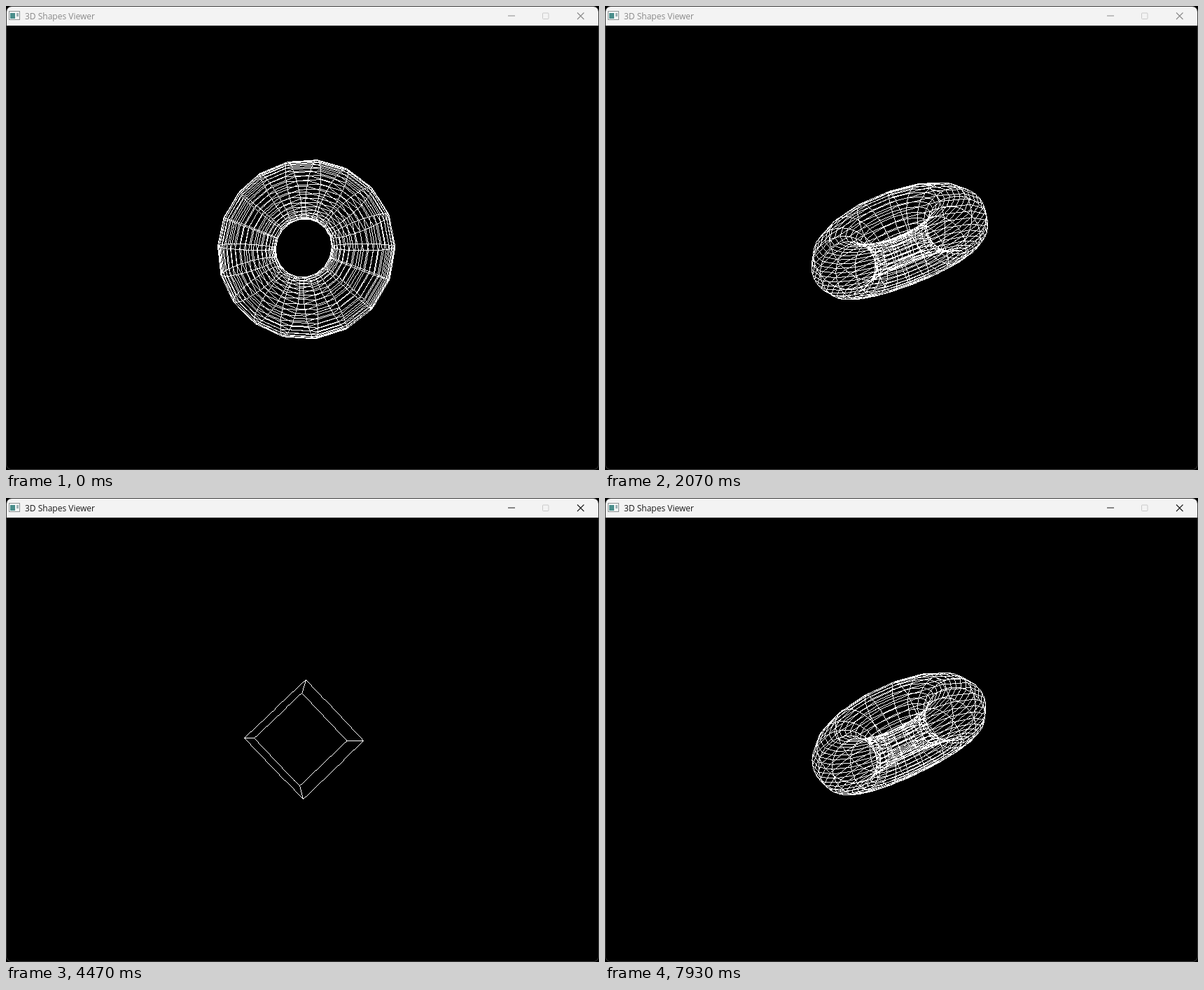
An HTML page with a canvas for the animation above (8 s loop, 847 px wide and 662 px high).

```html
<!DOCTYPE html>
<html lang="en">
<head>
<meta charset="utf-8">
<title>3D Shapes Viewer</title>
<style>
  html, body { margin: 0; width: 100%; height: 100%; overflow: hidden; background: #000; }
  canvas, svg { position: absolute; left: 0; top: 0; display: block; }
  text { font: 12px "Open Sans", "Noto Sans", sans-serif; }
</style>
</head>
<body>
<canvas id="view" width="847" height="662"></canvas>
<svg width="847" height="662" viewBox="0 0 847 662">
  <rect x="0.5" y="0.5" width="846" height="661" rx="7.5" fill="none" stroke="#3c3c3c"/>
  <path d="M1 28V8a7 7 0 0 1 7-7H839a7 7 0 0 1 7 7V28Z" fill="#f3f3f3"/>
  <g id="icon">
    <rect x="4.5" y="7.5" width="15" height="12" fill="#f4f6f6" stroke="#8d9494"/>
    <rect x="6" y="10" width="7" height="8" fill="#4b8f8c"/>
    <rect x="15" y="10" width="3" height="5" fill="#9fb3b5"/>
  </g>
  <text id="title" x="27" y="18.5">3D Shapes Viewer</text>
  <g fill="none">
    <path id="min" d="M717 14H727"/>
    <rect x="766.5" y="10" width="8.5" height="8.5" rx="1" stroke="#cacaca"/>
    <path id="close" d="M816 9.5L825.5 19M825.5 9.5L816 19" stroke-width="1.1"/>
  </g>
</svg>
<script>
const LOOP = 8000, STEP = 1000 / 15, FOCUS = 2200;
const W = 847, H = 662, CX = 423.5, CY = 344.5, FOCAL = 422.5, TOP = 28;

// time in ms, rotation in degrees
const SPIN = [[0, 12.6], [1200, 81.5], [2933, 173], [3300, 193], [4467, 267.2],
              [6000, 366.2], [7200, 442], [7460, 458.6], [8000, 485]];

const range = n => [...Array(n).keys()];

function torus(big, small, rings, sides) {
  const pts = [], edges = [];
  const at = (i, j) => (i % rings) * sides + j % sides;
  for (const i of range(rings)) for (const j of range(sides)) {
    const u = i / rings * 2 * Math.PI, v = j / sides * 2 * Math.PI;
    const r = big + small * Math.cos(v);
    pts.push([r * Math.cos(u), r * Math.sin(u), small * Math.sin(v)]);
    edges.push([at(i, j), at(i + 1, j)], [at(i, j), at(i, j + 1)]);
  }
  return { dist: 5, pts, edges };
}

function cube(h) {
  const pts = range(8).map(i => [1, 2, 4].map(bit => i & bit ? h : -h));
  const edges = [];
  for (const i of range(8)) for (const bit of [1, 2, 4])
    if (!(i & bit)) edges.push([i, i | bit]);
  return { dist: 4, pts, edges };
}

function pyramid(h) {
  const pts = [[-h, -h, h], [h, -h, h], [h, h, h], [-h, h, h], [0, 0, -h]];
  const edges = range(4).flatMap(i => [[i, (i + 1) % 4], [i, 4]]);
  return { dist: 4, pts, edges };
}

function octahedron(r) {
  const pts = [[r, 0, 0], [0, r, 0], [0, 0, r], [-r, 0, 0], [0, -r, 0], [0, 0, -r]];
  const edges = [[1, 4]];
  for (const i of range(6)) for (let j = i + 1; j < 6; j++)
    if (j !== i + 3) edges.push([i, j]);
  return { dist: 4, pts, edges };
}

const donut = torus(1, 0.5, 18, 36);
const SCENES = [[3300, donut], [5235, cube(0.5)], [6170, pyramid(0.5)],
                [7460, octahedron(2)], [LOOP, donut]];

const ctx = document.getElementById("view").getContext("2d");
const image = ctx.createImageData(W, H);
const pixels = new Uint32Array(image.data.buffer);

function angleAt(t) {
  const i = Math.max(1, SPIN.findIndex(k => k[0] >= t));
  const [t0, a0] = SPIN[i - 1], [t1, a1] = SPIN[i];
  return a0 + (a1 - a0) * (t - t0) / (t1 - t0);
}

// turn about x by half the angle, then about y by the whole angle
function project([x, y, z], dist, angle) {
  const b = -angle * Math.PI / 180, a = b / 2;
  const y1 = y * Math.cos(a) - z * Math.sin(a);
  const z1 = y * Math.sin(a) + z * Math.cos(a);
  const x2 = x * Math.cos(b) + z1 * Math.sin(b);
  const z2 = z1 * Math.cos(b) - x * Math.sin(b);
  const k = FOCAL / (dist - z2);
  return [CX + x2 * k, CY - y1 * k];
}

function line([x0, y0], [x1, y1]) {
  const n = Math.max(1, Math.ceil(Math.max(Math.abs(x1 - x0), Math.abs(y1 - y0))));
  for (let i = 0; i <= n; i++) {
    const x = Math.floor(x0 + (x1 - x0) * i / n);
    const y = Math.floor(y0 + (y1 - y0) * i / n);
    if (x >= 0 && x < W && y >= TOP && y < H) pixels[y * W + x] = 0xffffffff;
  }
}

function setFocus(on) {
  const ink = on ? "#1a1a1a" : "#8a8a8a";
  document.getElementById("title").setAttribute("fill", ink);
  for (const id of ["min", "close"])
    document.getElementById(id).setAttribute("stroke", ink);
}

function draw(t) {
  const shape = SCENES.find(s => t < s[0])[1];
  const angle = angleAt(t);
  const dots = shape.pts.map(p => project(p, shape.dist, angle));
  pixels.fill(0xff000000);
  for (const [i, j] of shape.edges) line(dots[i], dots[j]);
  ctx.putImageData(image, 0, 0);
  setFocus(t >= FOCUS);
}

let start = null, shown = -1;
function tick(now) {
  if (start === null) start = now;
  const t = (now - start) % LOOP;
  const step = Math.min(119, Math.floor((t + 4) / STEP));
  if (step !== shown) draw((shown = step) * STEP);
  requestAnimationFrame(tick);
}
draw(0);
requestAnimationFrame(tick);
</script>
</body>
</html>
```
